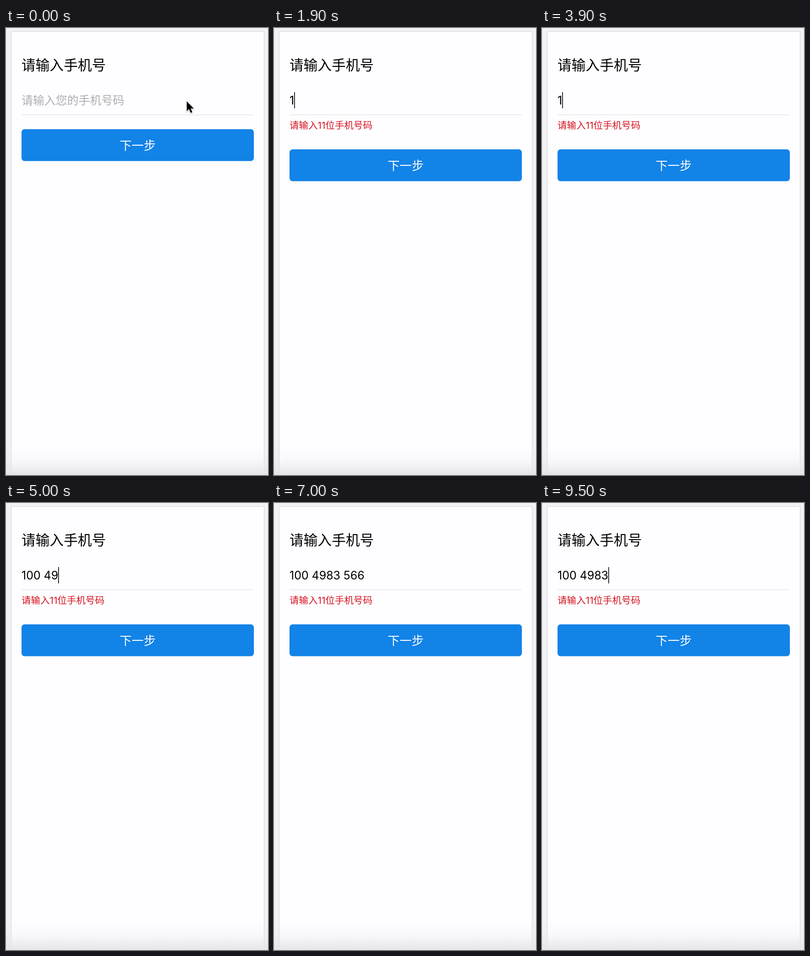
These frames come from a looping animation (574 by 976 pixels, 9.6 s). An HTML page:

```html
<!DOCTYPE html>
<html lang="zh-CN">
<head>
<meta charset="utf-8">
<title>请输入手机号</title>
<style>
  html, body { margin: 0; width: 100%; height: 100%; overflow: hidden; background: #f2f1f4; }
  svg { display: block; width: 574px; height: 976px; }
  text { font-family: Inter, "Noto Sans CJK SC", "Noto Sans CJK", sans-serif; font-size: 25px; white-space: pre; }
  .title { font-size: 30.8px; }
  .hint { fill: #aeadb0; }
  .error { font-size: 20.6px; fill: #d5141f; }
  .label { font-size: 26.4px; fill: #fff; text-anchor: middle; }
</style>
</head>
<body>
<svg viewBox="0 0 574 976">
  <defs>
    <linearGradient id="fade" x1="0" y1="0" x2="0" y2="1">
      <stop offset="0" stop-color="#e6e6e8" stop-opacity="0"/>
      <stop offset=".5" stop-color="#e6e6e8" stop-opacity=".25"/>
      <stop offset="1" stop-color="#e6e6e8"/>
    </linearGradient>
    <filter id="shadow" x="-50%" y="-50%" width="200%" height="200%">
      <feDropShadow dx="0" dy="1.5" stdDeviation="1.2" flood-opacity=".35"/>
    </filter>
  </defs>

  <rect x="11.5" y="7.5" width="554" height="980" fill="#fefdff" stroke="#d3d2d6"/>
  <rect y="912" width="574" height="64" fill="url(#fade)"/>

  <text class="title" x="34" y="92">请输入手机号</text>
  <text class="hint" id="hint" x="34" y="167">请输入您的手机号码</text>
  <text id="value" x="34" y="167"></text>
  <rect id="caret" y="140" width="1.6" height="35.5"/>
  <rect x="34" y="189" width="509" height="1" fill="#dddce0"/>
  <text class="error" id="error" x="34" y="220">请输入11位手机号码</text>

  <g id="button">
    <rect x="34" y="221" width="509" height="69.5" rx="6.5" fill="#1283e7"/>
    <text class="label" x="288.5" y="266">下一步</text>
  </g>

  <path id="pointer" d="M396 160v21.5l5-4.6 3.6 8.4 3.6-1.6-3.5-8h6.7z"
        stroke="#fff" stroke-width="1.6" paint-order="stroke" filter="url(#shadow)"/>
</svg>
<script>
  const LOOP = 9600, BLINK = 1000, LEFT = 34;
  const DIGITS = "10049835660";
  const FIRST_KEY = 1500;

  // [time, digits entered, caret blink offset]
  const EDITS = [
    [600, 0], [FIRST_KEY, 1], [4100, 2], [4400, 3], [4700, 4], [4950, 5],
    [5200, 6], [5400, 7], [5600, 8], [5800, 9], [6000, 10], [6200, 11],
    [6900, 10, BLINK / 2], [7400, 9], [7900, 8], [8400, 7]
  ];

  const byId = id => document.getElementById(id);
  const [hint, value, caret, error, button, pointer] =
    ["hint", "value", "caret", "error", "button", "pointer"].map(byId);

  const show = (el, on) => el.setAttribute("visibility", on ? "visible" : "hidden");
  const group = s => [s.slice(0, 3), s.slice(3, 7), s.slice(7)].filter(Boolean).join(" ");

  function draw(t) {
    const edit = EDITS.filter(([time]) => time <= t).pop();
    const [since, count, offset = 0] = edit || [0, 0];
    const invalid = count > 0 && count < DIGITS.length;

    value.textContent = group(DIGITS.slice(0, count));
    const width = count ? value.getComputedTextLength() : 0;
    caret.setAttribute("x", LEFT + width);
    show(caret, edit && (t - since + offset) % BLINK < BLINK / 2);
    show(hint, !count);
    show(error, invalid);
    show(pointer, t < FIRST_KEY);
    button.setAttribute("transform", `translate(0 ${invalid ? 44 : 0})`);
  }

  const start = performance.now();
  function tick(now) {
    draw(Math.max(0, now - start) % LOOP);
    requestAnimationFrame(tick);
  }
  draw(0);
  requestAnimationFrame(tick);
</script>
</body>
</html>
```
